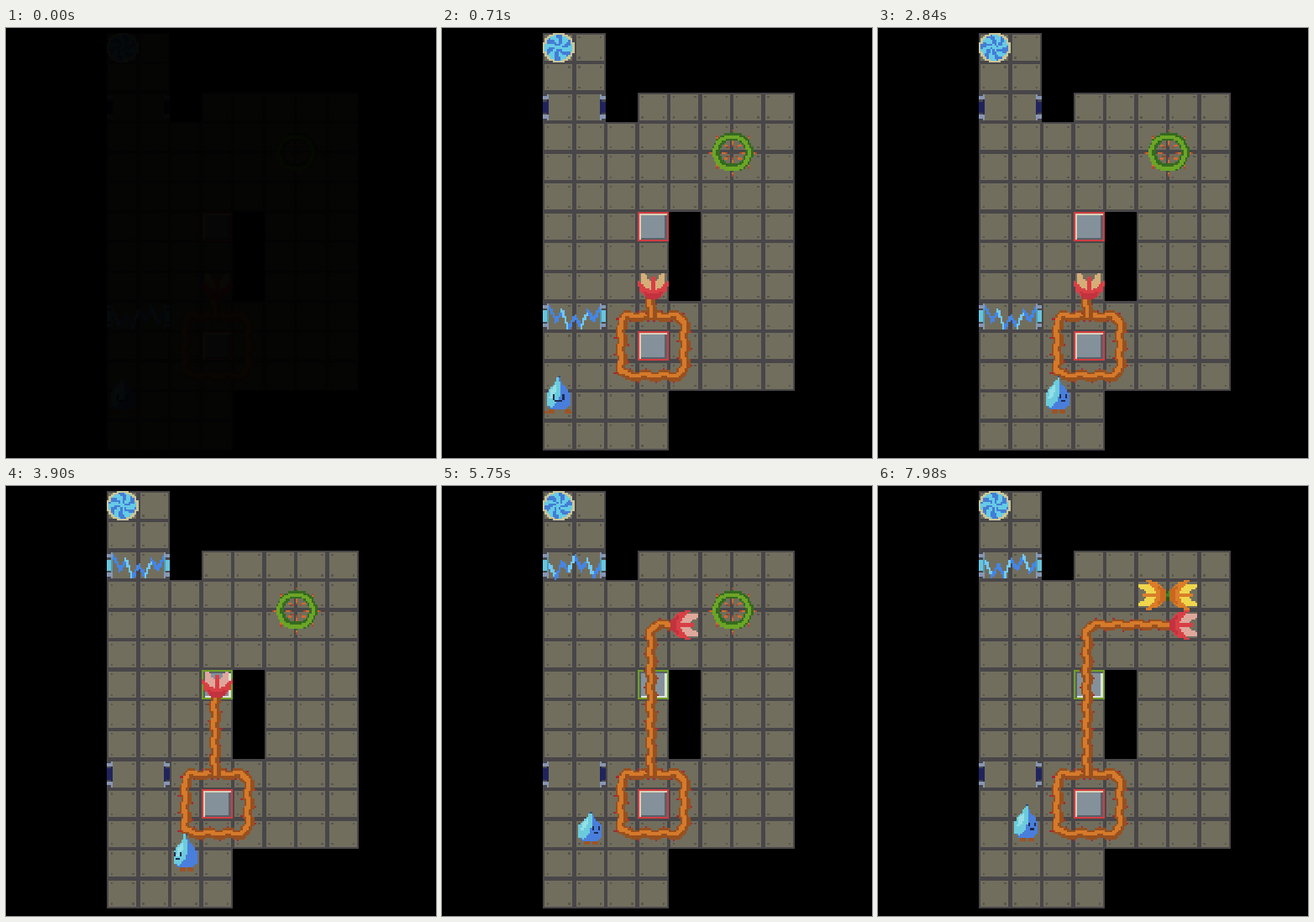
Animation, 512 px wide and 512 px high, one loop 8000 ms. Source, as an HTML page with a canvas:

```html
<!DOCTYPE html>
<html lang="en">
<head>
<meta charset="utf-8">
<style>
  html, body { margin: 0; width: 100%; height: 100%; overflow: hidden; background: #000; }
  canvas { display: block; width: 100%; height: 100%; image-rendering: pixelated; }
</style>
</head>
<body>
<canvas id="stage" width="512" height="512"></canvas>
<script>
const LOOP = 8000, TILE = 16, COLS = 8, ROWS = 14;
const stage = document.getElementById('stage').getContext('2d');
const makeLayer = () => {
  const layer = document.createElement('canvas');
  layer.width = COLS * TILE;
  layer.height = ROWS * TILE;
  return layer.getContext('2d');
};
const floor = makeLayer(), art = makeLayer();

// When the vine advances, and the hops of the drop: start, from cell, to cell.
const vineSteps = [2900, 3570, 4240, 4910, 5580, 6250, 6920];
const hops = [
  [850, 0, 12, 1, 12], [1200, 1, 12, 2, 12],
  [2900, 2, 12, 3, 12], [3570, 3, 12, 2, 12], [4240, 2, 12, 3, 12],
  [4910, 3, 12, 2, 12], [5230, 2, 12, 1, 12], [5550, 1, 12, 1, 11]
];
const HOP_TIME = 300;

function rect(color, x, y, w = 1, h = 1, ctx = art) {
  ctx.fillStyle = color;
  ctx.fillRect(Math.round(x), Math.round(y), w, h);
}

// Fills every pixel whose centre passes the test.
function plot(x0, y0, x1, y1, colorAt) {
  for (let y = Math.floor(y0); y < y1; y++)
    for (let x = Math.floor(x0); x < x1; x++) {
      const color = colorAt(x + 0.5, y + 0.5);
      if (color) rect(color, x, y);
    }
}

function polygon(color, points) {
  const path = new Path2D();
  points.forEach(([x, y]) => path.lineTo(x, y));
  path.closePath();
  const xs = points.map(p => p[0]), ys = points.map(p => p[1]);
  plot(Math.min(...xs), Math.min(...ys), Math.max(...xs), Math.max(...ys),
    (x, y) => art.isPointInPath(path, x, y) && color);
}

function isFloor(col, row) {
  if (row < 2) return col < 2;
  if (row === 2) return col !== 2;
  if (row > 11) return col < 4;
  return !(col === 4 && row > 5 && row < 9);
}

for (let row = 0; row < ROWS; row++)
  for (let col = 0; col < COLS; col++) {
    if (!isFloor(col, row)) continue;
    const x = col * TILE, y = row * TILE;
    rect('#494649', x, y, 16, 16, floor);
    rect('#716e5e', x + 1, y + 1, 14, 14, floor);
    for (const dx of [2, 13]) for (const dy of [2, 13]) rect('#58554e', x + dx, y + dy, 1, 1, floor);
  }

function portal(t) {
  plot(0, 0, 16, 16, (x, y) => {
    const dx = x - 8, dy = y - 8, r = Math.hypot(dx, dy);
    if (r > 8) return null;
    if (r > 6.9) return '#c9c69a';
    const blade = Math.sin(6 * Math.atan2(dy, dx) + r * 0.55 - t / 130);
    return r > 1.5 && blade > 0.1 ? '#437dd6' : '#66cbe5';
  });
}

function button(col, row, pressed) {
  const x = col * TILE, y = row * TILE;
  rect(pressed ? '#6fa022' : '#d23c40', x, y, 16, 16);
  rect(pressed ? '#59616a' : '#d6d0b8', x + 1, y + 1, 14, 14);
  rect(pressed ? '#dfe3e2' : '#59616a', x + 2, y + 2, 13, 13);
  rect('#84919a', x + 2, y + 2, 12, 12);
}

function gate(row, closed, t) {
  const y = row * TILE;
  for (const [x, inner] of [[0, 2], [30, 29]]) {
    rect('#494649', x, y + 1, 2, 14);
    rect('#8797b4', inner, y + 1, 1, 14);
    rect('#8797b4', x, y + 2, 2, 2);
    rect('#8797b4', x, y + 12, 2, 2);
    rect(closed ? '#69c4dc' : '#20245c', x, y + 5, 2, 6);
    rect(closed ? '#4f9bb8' : '#20245c', inner, y + 4, 1, 8);
  }
  if (!closed) return;
  const phase = Math.floor(t / 133) % 4;
  const nodes = Array.from({ length: 9 }, (_, i) => {
    const reach = 3.5 + 2.5 * Math.sin(i * 2.3 + phase * 1.7);
    return [3 + i * 3.2, y + 8 + (i % 2 ? reach : -reach)];
  });
  for (let i = 0; i < 8; i++) {
    const [ax, ay] = nodes[i], [bx, by] = nodes[i + 1];
    for (let k = 0; k < 14; k++) {
      const f = k / 14, px = ax + (bx - ax) * f, py = ay + (by - ay) * f;
      rect((i + phase) % 3 ? '#4585e4' : '#72c8f1', px, py, 1, 2);
    }
  }
}

const curves = new Map();
function curvePoints(d) {
  if (!curves.has(d)) {
    const path = document.createElementNS('http://www.w3.org/2000/svg', 'path');
    path.setAttribute('d', d);
    const points = [], length = path.getTotalLength();
    for (let s = 0; s <= length; s += 0.5) {
      const p = path.getPointAtLength(s), q = path.getPointAtLength(s + 0.2), o = path.getPointAtLength(s - 0.2);
      const size = Math.hypot(q.x - o.x, q.y - o.y) || 1;
      const nx = (o.y - q.y) / size, ny = (q.x - o.x) / size, sway = 0.7 * Math.sin(s * 0.65);
      points.push({ x: p.x + nx * sway, y: p.y + ny * sway, nx, ny });
    }
    curves.set(d, points);
  }
  return curves.get(d);
}

function vine(d, main, dark, thorn) {
  const points = curvePoints(d);
  points.forEach((p, i) => {
    if (i % 9 !== 4) return;
    const side = i % 2 ? 1 : -1;
    for (const reach of [2.4, 3.2]) rect(thorn, p.x + p.nx * side * reach - 0.5, p.y + p.ny * side * reach - 0.5);
  });
  for (const p of points) rect(dark, p.x - 2, p.y - 2, 4, 4);
  for (const p of points) rect(main, p.x - 1.4, p.y - 1.4, 2, 2);
}
const brownVine = d => vine(d, '#d57a2b', '#97501f', '#a52b32');

// Quarter turns are clockwise from facing up.
function flower(col, row, turns, petal, shade, lobe) {
  const place = ([x, y]) => {
    for (let i = 0; i < turns; i++) [x, y] = [16 - y, x];
    return [col * TILE + x, row * TILE + y];
  };
  const shape = (color, points) => polygon(color, points.map(place));
  shape(petal, [[0, 5], [2.5, 7], [6, 6], [8, 2], [10, 6], [13.5, 7], [16, 5], [15, 10], [11, 15], [5, 15], [1, 10]]);
  shape(shade, [[3, 11], [8, 12.5], [13, 11], [11, 15], [5, 15]]);
  const left = [[2, 1.5], [4, 1.5], [7, 6], [7, 10], [5, 9], [2, 6]];
  shape(lobe, left);
  shape(lobe, left.map(([x, y]) => [16 - x, y]));
}

function thornRing() {
  const cx = 96.5, cy = 64;
  for (let i = 0; i < 8; i++) {
    const a = i * Math.PI / 4;
    for (const r of [3.5, 4.5, 5.5, 11, 12])
      rect(r === 12 || r === 3.5 ? '#a8492c' : '#cf6a2d', cx - 0.5 + r * Math.cos(a), cy - 0.5 + r * Math.sin(a));
  }
  plot(84, 52, 109, 77, (x, y) => {
    const r = Math.hypot(x - cx, y - cy), lit = Math.hypot(x - cx + 0.5, y - cy - 0.4);
    if (r > 10.5 || r < 6.4) return null;
    return lit > 7.6 && lit < 9.8 ? '#6ca526' : '#356a20';
  });
}

function twinFlower(folded) {
  vine(folded ? 'M92 56H100' : 'M93 56Q104 56 104 67', '#35862a', '#22591f', '#d4702c');
  const head = (col, row, turns) => flower(col, row, turns, '#db7d29', '#c9681f', '#efd64c');
  head(5, 3, 3);
  if (folded) head(6, 3, 1);
  else head(6, 4, 2);
}

function drop(t) {
  let col = 0, row = 12, facing = 0, lift = 0, hopping = false;
  for (const [start, fromCol, fromRow, toCol, toRow] of hops) {
    if (t < start) break;
    const p = Math.min(1, (t - start) / HOP_TIME);
    col = fromCol + (toCol - fromCol) * p;
    row = fromRow + (toRow - fromRow) * p;
    facing = Math.sign(toCol - fromCol) || 1;
    lift = 4 * Math.sin(Math.PI * p);
    hopping = p < 1;
  }
  const x = Math.round(col * TILE), y = Math.round(row * TILE - lift);
  const bob = hopping ? 1.5 : 0.5 + 0.5 * Math.sin(t / 160);
  const tip = -8 + bob, lean = facing * 0.4;
  const shape = (color, points) => polygon(color, points.map(([px, py]) => [x + px, y + py]));

  const spread = facing ? 0 : 2;
  rect('#9c5426', x + 5 - spread, y + 10, 3, 2);
  rect('#9c5426', x + 9 + spread, y + 10, 3, 2);
  if (!facing) {
    rect('#9c5426', x + 1, y + 11, 3);
    rect('#9c5426', x + 12, y + 11, 3);
  }
  shape('#4a7edc', [[8 + lean, tip], [10, -4 + bob], [13, 0], [14.5, 4], [13.5, 8], [11, 10.3],
    [5, 10.3], [2.5, 8], [1.5, 4], [3, 0], [6, -4 + bob]]);
  shape('#6bcbdc', [[8 + lean, tip], [9, -3], [9, 1], [7.5, 6], [5, 9], [2.5, 8], [1.5, 4], [3, 0], [6, -4 + bob]]);
  shape('#94dfe6', [[6.5, -3 + bob], [7.2, -1], [5, 4], [3.3, 4], [4, 0]]);
  rect('#2b4e86', x + 8 + lean, y + tip, 1, 1);

  const [eyeA, eyeB, mouth] = facing > 0 ? [9, 12, 10] : facing < 0 ? [2, 5, 3] : [5, 10, 6];
  const ink = '#1c2b52';
  rect(ink, x + eyeA, y + 2, 1, 2);
  rect(ink, x + eyeB, y + 2, 1, 2);
  rect(ink, x + mouth, y + 5, facing ? 2 : 4, 1);
  if (!facing) {
    rect(ink, x + 5, y + 4);
    rect(ink, x + 10, y + 4);
  }
}

function draw(t) {
  const step = vineSteps.filter(s => t >= s).length;
  const headCol = 3 + Math.max(0, step - 4), headRow = 8 - Math.min(step, 4);
  const pressed = step >= 2;

  art.drawImage(floor.canvas, 0, 0);
  portal(t);
  gate(2, pressed, t);
  gate(9, !pressed, t);
  button(3, 6, pressed);
  button(3, 10, false);
  if (step < 6) thornRing();
  else twinFlower(step === 7);

  brownVine('M55 152H45Q40 152 40 157V179Q40 184 45 184H67Q72 184 72 179V157Q72 152 67 152Z');
  brownVine(step > 4
    ? `M55 152V77Q55 72 60 72H${headCol * TILE + 2}`
    : `M55 152V${headRow * TILE + 14}`);
  flower(headCol, headRow, step > 4 ? 1 : 0, '#d83f45', '#c2323f', step ? '#dfa79b' : '#d5ad78');
  drop(t);

  stage.globalAlpha = 1;
  stage.fillStyle = '#000';
  stage.fillRect(0, 0, 512, 512);
  stage.globalAlpha = Math.min(1, 0.04 + t * 0.003);
  stage.imageSmoothingEnabled = false;
  stage.drawImage(art.canvas, 120, 5.5, 300, 497.5);
}

const begin = performance.now();
function tick() {
  draw((performance.now() - begin) % LOOP);
  requestAnimationFrame(tick);
}
tick();
</script>
</body>
</html>
```
